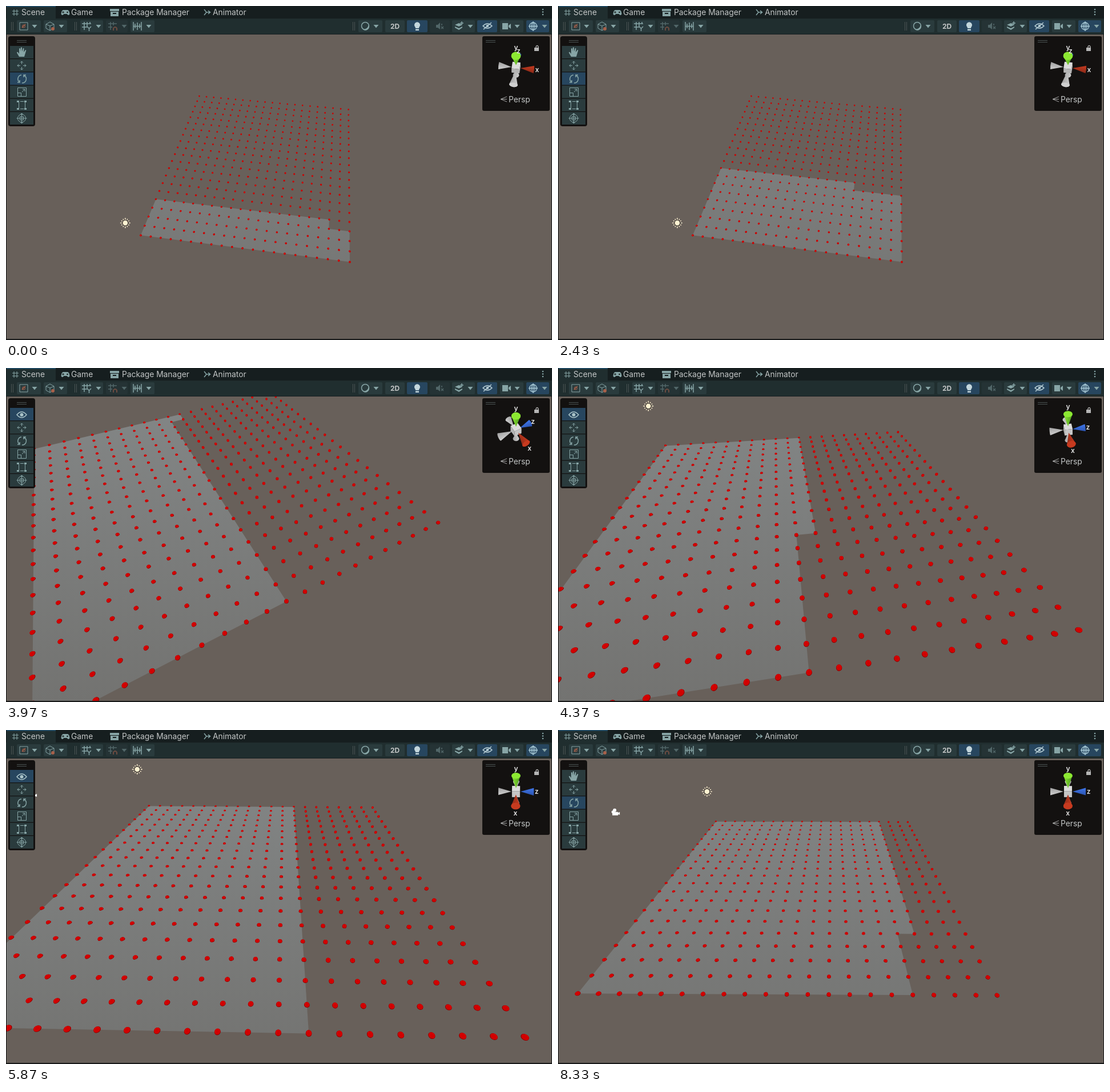
Recreate the animation shown at these times as an HTML page with a canvas. Size 956 by 586 pixels, loop 8360 ms.

```html
<!DOCTYPE html>
<html lang="en">
<head>
<meta charset="utf-8">
<title>Mesh generation</title>
<style>
  html, body { margin: 0; width: 100%; height: 100%; overflow: hidden; background: #191a1a; }
  #stage { position: relative; width: 956px; height: 586px; overflow: hidden; }
  #stage > * { position: absolute; left: 0; top: 0; }
  #gizmo { left: 834px; top: 53px; }
  svg { display: block; }
  text { font: 13.8px Inter, sans-serif; fill: #c3c6c6; }
  .btn { fill: #2a3b3d; }
  .on { fill: #27465f; }
  .panel { fill: #131110; }
  .line { fill: none; stroke: #87a5a6; stroke-width: 1.5; }
  .thin { fill: none; stroke: #87a5a6; stroke-width: 1; }
  .fill { fill: #87a5a6; }
  .dim { opacity: .45; }
  .grip { stroke: #4b5353; stroke-width: 1; fill: none; }
</style>
</head>
<body>
<div id="stage">
  <canvas id="scene" width="956" height="586"></canvas>
  <svg width="956" height="586" viewBox="0 0 956 586">
    <rect width="956" height="23" fill="#161e1f"/>
    <rect y="22" width="956" height="28" fill="#202e2f"/>
    <rect x="1" width="86" height="23" fill="#202e2f"/>
    <rect x="1" width="86" height="1.5" fill="#20506f"/>
    <path d="M0 49.500H956" stroke="#182021"/>

    <!-- tabs -->
    <path class="thin" d="M14 6V17M19 6V17M11 9H22M11 14H22"/>
    <text x="27" y="16">Scene</text>
    <path class="fill" d="M100 7H108Q111 8 111.500 14Q110 18 106.500 14H101.500Q98 18 96.500 14Q97 8 100 7Z"/>
    <path d="M100 9V13M98 11H102" stroke="#161e1f"/><circle cx="107.500" cy="11" r="1.300" fill="#161e1f"/>
    <text x="114" y="16">Game</text>
    <path class="fill" d="M182 5H198V9H182ZM183 10H197V18H183Z"/><path d="M187 13H193" stroke="#161e1f" stroke-width="2"/>
    <text x="203" y="16">Package Manager</text>
    <path class="line" d="M347 6L351 11L347 16M351 11H357M354 8L357.500 11L354 14"/>
    <text x="362" y="16">Animator</text>
    <g class="fill"><circle cx="940" cy="6" r="1.300"/><circle cx="940" cy="10.500" r="1.300"/><circle cx="940" cy="15" r="1.300"/></g>

    <!-- toolbar -->
    <path class="grip" d="M9.500 28V43M12.500 28V43M120.500 28V43M123.500 28V43M607.500 28V43M610.500 28V43"/>
    <g id="bar"></g>
    <g stroke-linejoin="round">
      <rect class="thin" x="24" y="29" width="14" height="13"/>
      <path d="M28 38L34 32" stroke="#a7604a" stroke-width="1.500"/><circle cx="31" cy="35.500" r="2.500" fill="none" stroke="#a7604a"/>
      <path class="thin" d="M70 32L77 28L84 32V39L77 43L70 39ZM70 32L77 35L84 32M77 35V43"/>
      <circle cx="82" cy="40" r="3" fill="#a7604a"/>
      <path class="line" d="M137 28V42M142 28V36M133 31H149M133 37H142M147 28V31"/>
      <path class="line" d="M142 36L145.500 39.500L149 36M145.500 39V44"/>
      <g class="dim"><path class="line" d="M183 28V42M188 28V34M179 31H194M179 37H186"/><path d="M188 43V39Q191 35 194 39V43" fill="none" stroke="#c06a50" stroke-width="2"/></g>
      <path class="line" d="M223 28V43M237 28V43M226 31V39M230 29V42M234 31V39M223 35.500H237"/>
      <circle class="line" cx="629" cy="35" r="6.500"/><path class="fill" d="M635 33A6.500 6.500 0 0 1 625 41Q633 41 635 33Z"/>
      <text x="681" y="40" text-anchor="middle" style="font-size:12px;font-weight:700">2D</text>
      <path d="M717 39Q717 37 715.500 35.500A5 5 0 1 1 724.500 35.500Q723 37 723 39ZM717 40.500H723V43H717Z" fill="#c3d6dc"/>
      <g class="dim"><path class="fill" d="M753 33H756L760 29V41L756 38H753Z"/><path class="line" d="M762 36L766 40M766 36L762 40M763 31V34"/></g>
      <path class="fill" d="M786 33L793 30L799 33L793 36ZM786 36L793 39L799 36V38L793 42L786 38Z"/><path class="line" d="M798 27V33M795 30H801"/>
      <path d="M835 35Q843 27 851 35Q843 43 835 35ZM836 41L850 29" fill="none" stroke="#b4cbd3" stroke-width="1.600"/><circle cx="843" cy="35" r="2.300" fill="#b4cbd3"/>
      <path class="fill" d="M869 30H879V41H869ZM880 34L884 31V40L880 37Z"/>
      <g fill="none" stroke="#a9cbd8" stroke-width="1.300"><circle cx="923" cy="35.500" r="6.500"/><ellipse cx="923" cy="35.500" rx="3" ry="6.500"/><path d="M915 35.500H931M923 27V44"/></g>
    </g>

    <!-- tool strip -->
    <rect class="panel" x="4" y="53" width="47" height="158" rx="4"/>
    <path class="grip" d="M19 60.500H36M19 63.500H36"/>
    <g id="tools"></g>
    <path id="hand" class="fill" d="M23 89L19 82Q19 80 21 81L23 84V75Q24 73 25 75V80L26 73Q27 71.500 28 73V80L30 74Q31 73 31.500 75L31 81L34 77Q36 77 35 79L32 89Z"/>
    <g id="eye"><path d="M19 82Q27.500 72 36 82Q27.500 92 19 82Z" fill="none" stroke="#a9c3c8" stroke-width="1.500"/><circle cx="27.500" cy="82" r="3" fill="#a9c3c8"/></g>
    <path class="thin" d="M27.500 97V102M27.500 107V112M20 104.500H25M30 104.500H35M25 99.500L27.500 97L30 99.500M25 109.500L27.500 112L30 109.500M22.500 102L20 104.500L22.500 107M32.500 102L35 104.500L32.500 107"/>
    <path class="line" d="M23 133A7 7 0 0 1 27 121M32 122A7 7 0 0 1 28 135M20 134H24V130M35 121H31V125"/>
    <path class="thin" d="M20.500 143.500H35.500V158.500H20.500ZM20.500 152.500H26.500V158.500M28 151L33 146M29 146H33V150"/>
    <path class="thin" d="M22.500 169V179M33.500 169V179M25 167.500H31M25 180.500H31"/>
    <path class="fill" d="M19 166H23V169H19ZM32 166H36V169H32ZM19 179H23V182H19ZM32 179H36V182H32Z"/>
    <g class="thin"><circle cx="27.500" cy="197" r="7"/><path d="M27.500 188V206M18.500 197H36.500M24.500 194H30.500V200H24.500ZM25.500 190L27.500 188L29.500 190M25.500 204L27.500 206L29.500 204"/></g>

    <!-- orientation panel -->
    <rect class="panel" x="834" y="53" width="118" height="131" rx="3"/>
    <path class="grip" d="M840 60.500H857M840 63.500H857"/>
    <path d="M925 73H933V79H925Z" fill="#b5b5b5"/><path d="M928 73V71Q930 68 932 71V73" fill="none" stroke="#b5b5b5" stroke-width="1.300"/>
    <path d="M877 159L866 163.500L877 168M866 163.500H877" fill="none" stroke="#a8a8a8"/>
    <text x="880" y="169">Persp</text>
  </svg>
  <canvas id="gizmo" width="118" height="131"></canvas>
</div>
<script>
const LOOP = 8360, SIZE = 20, FOCAL = 463, CX = 478, CY = 317;
const $ = id => document.getElementById(id);
const ctx = $('scene').getContext('2d'), giz = $('gizmo').getContext('2d');

// [x, width, arrow x or 0, style]
const bar = [[19, 42, 50], [66, 41, 97], [130, 40, 162], [175, 38, 207, 'dim'], [218, 42, 250],
  [617, 42, 648], [664, 34, 0], [702, 36, 0, 'on'], [742, 35, 0, 'dim'], [781, 40, 813],
  [825, 35, 0, 'on'], [865, 41, 895], [911, 40, 943, 'on']];
$('bar').innerHTML = bar.map(([x, w, a, c = '']) =>
  `<rect class="btn ${c}" x="${x}" y="25" width="${w}" height="21" rx="2"/>` +
  (a ? `<path class="${c == 'dim' ? c : ''}" style="fill:#87a5a6" d="M${a - 4.5} 33H${a + 4.5}L${a} 38.500Z"/>` : '')).join('');
$('tools').innerHTML = [0, 1, 2, 3, 4, 5].map(i =>
  `<rect class="btn" x="7" y="${70 + i * 23.2}" width="41" height="22"/>`).join('');
const tools = $('tools').children;

// Camera poses: x, y, z, yaw, pitch (degrees)
const poses = [
  [14.42, 24.3, -7.37, -7.38, 58.9],
  [24.629, 10.93, 6.988, -60.45, 52],
  [23.04, 8.05, 11.6, -90.4, 40],
  [23.787, 8.76, 12.09, -91, 41.7],
  [26.76, 11.36, 12.14, -90.28, 41.6]
];
const moves = [
  [3050, 3970, k => k * k],
  [3970, 4870, k => k * (2 - k)],
  [4870, 5870, k => k * k * (3 - 2 * k)],
  [5870, 6650, k => 1 - (1 - k) ** 5]
];
const fills = [[0, 78], [2430, 155], [3970, 201], [4870, 229], [5870, 260], [6570, 281], [8330, 336], [8361, 336.5]];

const mix = (a, b, k) => a + (b - a) * k;
const dot = (a, b) => a[0] * b[0] + a[1] * b[1] + a[2] * b[2];

function poseAt(t) {
  let p = poses[0];
  moves.forEach(([a, b, ease], i) => {
    if (t > a) {
      const k = ease(Math.min(1, (t - a) / (b - a)));
      p = poses[i].map((v, j) => mix(v, poses[i + 1][j], k));
    }
  });
  return p;
}

function quadsAt(t) {
  const i = fills.findIndex(f => f[0] > t);
  const [a, n] = fills[i - 1], [b, m] = fills[i];
  return Math.floor(mix(n, m, (t - a) / (b - a)) + 0.2);
}

function camera([x, y, z, yaw, pitch]) {
  const a = yaw * Math.PI / 180, b = pitch * Math.PI / 180;
  const s = Math.sin(a), c = Math.cos(a), sp = Math.sin(b), cp = Math.cos(b);
  const right = [c, 0, -s], up = [s * sp, cp, c * sp], fwd = [s * cp, -sp, c * cp];
  const project = (px, py, pz) => {
    const v = [px - x, py - y, pz - z], d = dot(v, fwd);
    return [CX + FOCAL * dot(v, right) / d, CY - FOCAL * dot(v, up) / d, d];
  };
  return { x, y, z, right, up, fwd, project };
}

function poly(g, pts, color) {
  g.beginPath();
  pts.forEach(p => g.lineTo(p[0], p[1]));
  g.closePath();
  g.fillStyle = color;
  g.fill();
}

function oval(g, x, y, rx, ry, turn, color) {
  g.beginPath();
  g.ellipse(x, y, rx, ry, turn, 0, 7);
  g.fillStyle = color;
  g.fill();
}

const shade = ctx.createLinearGradient(0, 50, 0, 584);
shade.addColorStop(0, '#838686');
shade.addColorStop(1, '#737371');

function drawMesh(cam, n) {
  const row = Math.floor(n / SIZE), col = n % SIZE;
  const top = col ? row + 1 : row;
  const pts = [[0, 0], [SIZE, 0], [SIZE, row], [col, row], [col, top], [0, top]];
  poly(ctx, pts.map(([x, z]) => cam.project(x, 0, z)), shade);
}

function covered(x, z, n) {
  const i = Math.floor(x), j = Math.floor(z);
  return i >= 0 && i < SIZE && j >= 0 && j * SIZE + i < n;
}

// A ball seen in perspective; "low" squashes its lower half where the mesh hides it.
function drawBall(cam, x, z, n) {
  const [px, py, d] = cam.project(x, 0, z);
  if (d < 0.5) return;
  const vx = cam.x - x, vz = cam.z - z, flat = Math.hypot(vx, vz);
  const sunk = covered(x + 0.1 * vx / flat, z + 0.1 * vz / flat, n);
  const low = sunk ? cam.y / Math.hypot(flat, cam.y) : 1;
  const dx = px - CX, dy = py - CY, r = FOCAL * 0.1 / d;
  const turn = Math.atan2(dy, dx);
  const tip = cam.project(x, 0.1, z);
  const lean = Math.atan2(tip[1] - py, tip[0] - px) + Math.PI / 2;
  const half = (y, k, color) => {
    ctx.beginPath();
    ctx.ellipse(0, y, r * k, r * k, 0, Math.PI, 2 * Math.PI);
    ctx.ellipse(0, y, r * k, r * k * low, 0, 0, Math.PI);
    ctx.fillStyle = color;
    ctx.fill();
  };
  ctx.save();
  ctx.translate(px, py);
  ctx.rotate(turn);
  ctx.scale(Math.hypot(1, Math.hypot(dx, dy) / FOCAL), 1);
  ctx.rotate(lean - turn);
  half(0, 1, r > 3 ? '#960000' : '#cd0000');
  if (r > 3) half(-r * 0.12, 0.9, '#d20000');
  ctx.restore();
}

function drawSun([x, y, d]) {
  if (d < 0) return;
  ctx.strokeStyle = '#fff2d2';
  ctx.lineWidth = 1.4;
  ctx.beginPath();
  for (let i = 0; i < 12; i++) {
    const c = Math.cos(i * Math.PI / 6), s = Math.sin(i * Math.PI / 6), r = i % 3 ? 8 : 9;
    ctx.moveTo(x + 6 * c, y + 6 * s);
    ctx.lineTo(x + r * c, y + r * s);
  }
  ctx.stroke();
  oval(ctx, x, y, 5.6, 5.6, 0, '#4a443c');
  oval(ctx, x, y, 4.3, 4.3, 0, '#fff2d2');
}

function drawCameraIcon([x, y, d]) {
  if (d < 0) return;
  oval(ctx, x - 1, y - 3, 3, 3, 0, '#fff');
  oval(ctx, x - 4, y, 2.5, 2.5, 0, '#fff');
  ctx.fillStyle = '#fff';
  ctx.fillRect(x - 5, y, 10, 6);
  poly(ctx, [[x + 4, y + 2], [x + 8, y], [x + 8, y + 5], [x + 4, y + 4]], '#fff');
}

const axes = [
  [[1, 0, 0], '#c63a1f', '#8c2a18', 'x'], [[0, 1, 0], '#8ce832', '#4f9a20', 'y'], [[0, 0, 1], '#3f76ea', '#2b53ad', 'z'],
  [[-1, 0, 0], '#cfcfcf', '#a2a2a2'], [[0, -1, 0], '#cfcfcf', '#a2a2a2'], [[0, 0, -1], '#cfcfcf', '#a2a2a2']
];

function drawGizmo(cam) {
  const ox = 59, oy = 55;
  giz.clearRect(0, 0, 118, 131);
  const view = a => [dot(a, cam.right), -dot(a, cam.up), -dot(a, cam.fwd)];

  const cone = ([a, color, dark]) => {
    const [x, y, near] = view(a), s = 1 / (1 - 0.25 * near);
    const bx = ox + 31 * x * s, by = oy + 31 * y * s;
    const turn = Math.atan2(y, x), r = 6.5 * s;
    const nx = -Math.sin(turn) * r, ny = Math.cos(turn) * r;
    const g = giz.createLinearGradient(bx - nx, by - ny, bx + nx, by + ny);
    g.addColorStop(0, color);
    g.addColorStop(1, dark);
    const flat = Math.abs(near) * r;
    oval(giz, bx, by, flat, r, turn, g);
    poly(giz, [[ox + 8 * x, oy + 8 * y], [bx + nx, by + ny], [bx - nx, by - ny]], g);
    if (near > 0.5) oval(giz, bx, by, flat, r, turn, color);
  };

  const cube = () => {
    const faces = axes.map(f => f[0]).filter(a => view(a)[2] > 0.01);
    for (const a of faces) {
      const u = [a[1], a[2], a[0]], v = [a[2], a[0], a[1]];
      const corner = ([i, j]) => {
        const p = view(a.map((n, k) => 7 * (n + i * u[k] + j * v[k])));
        return [ox + p[0], oy + p[1]];
      };
      poly(giz, [[-1, -1], [1, -1], [1, 1], [-1, 1]].map(corner), a[1] ? '#dcdcdc' : a[0] ? '#c6c6c6' : '#b4b4b4');
    }
  };

  const order = axes.slice().sort((p, q) => view(p[0])[2] - view(q[0])[2]);
  order.filter(f => view(f[0])[2] <= 0).forEach(cone);
  cube();
  order.filter(f => view(f[0])[2] > 0).forEach(cone);

  giz.font = '600 12px Inter, sans-serif';
  giz.textAlign = 'center';
  giz.textBaseline = 'middle';
  giz.fillStyle = '#e4e4e4';
  for (const [a, , , name] of axes.slice(0, 3)) {
    const [x, y, near] = view(a), len = Math.hypot(x, y);
    const r = 30 * len / (1 - 0.25 * near) + 6 + 10 * Math.max(0, near);
    giz.fillText(name, ox + x / len * r, oy + y / len * r);
  }
}

function drawTools(flying) {
  $('eye').style.display = flying ? '' : 'none';
  $('hand').style.display = flying ? 'none' : '';
  tools[0].classList.toggle('on', flying);
  tools[2].classList.toggle('on', !flying);
}

function draw(t) {
  const cam = camera(poseAt(t)), n = quadsAt(t);
  ctx.fillStyle = '#191a1a';
  ctx.fillRect(0, 0, 956, 586);
  ctx.save();
  ctx.beginPath();
  ctx.rect(1, 50, 954, 534);
  ctx.clip();
  ctx.fillStyle = '#68605a';
  ctx.fillRect(0, 50, 956, 536);
  drawMesh(cam, n);
  for (let z = SIZE; z >= 0; z--) {
    for (let x = 0; x <= SIZE; x++) drawBall(cam, x, z, n);
  }
  drawSun(cam.project(0, 3, 0));
  drawCameraIcon(cam.project(0, 1, -10));
  ctx.restore();
  drawGizmo(cam);
  drawTools(t >= 3030 && t < 6000);
}

const start = performance.now();
function tick() {
  draw((performance.now() - start) % LOOP);
  requestAnimationFrame(tick);
}
tick();
</script>
</body>
</html>
```
